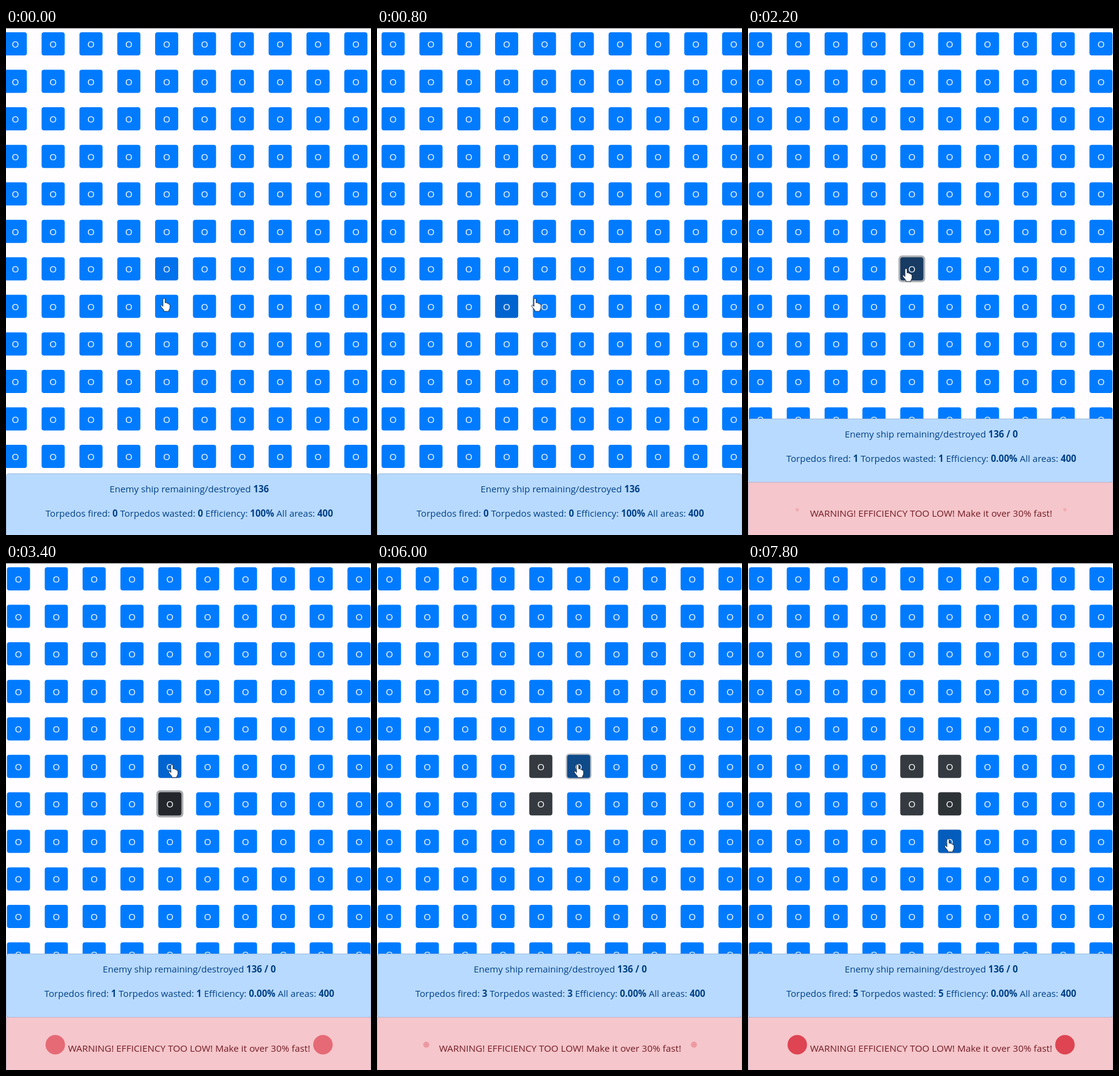
An HTML page that plays this animation: 600x832 px, repeating every 8000 ms.

```html
<!DOCTYPE html>
<html lang="en">
<head>
<meta charset="utf-8">
<title>Torpedo game</title>
<style>
  html, body { margin: 0; width: 100%; height: 100%; overflow: hidden; background: #fff; }
  svg { display: block; width: 100vw; height: 100vh; }
  text { font-family: "Open Sans", "Noto Sans", sans-serif; text-anchor: middle; }
  .bold { font-weight: 700; }
  #stats text { fill: #004085; }
  #warning text { fill: #721c24; font-size: 15.34px; }
</style>
</head>
<body>
<svg id="stage" viewBox="0 0 600 832">
  <rect width="600" height="832" fill="#fffdff"/>
  <g id="grid"></g>
  <rect width="600" height="1" fill="#77777c"/>
  <g id="stats">
    <rect x="0.5" y="0.5" width="599.5" height="104" rx="4" fill="#b8daff" stroke="#9dbbdb"/>
    <text id="ships" x="301.3" y="31" font-size="15.1"></text>
    <text id="shots" x="301.3" y="71" font-size="15.05"></text>
  </g>
  <g id="warning">
    <rect x="0.5" y="745.5" width="599.5" height="90" fill="#f5c6cb" stroke="#c3b3c8"/>
    <text x="301" y="802">WARNING! EFFICIENCY TOO LOW! Make it over 30% fast!</text>
    <circle class="pulse" cx="81" cy="790.5" fill="#dc3545"/>
    <circle class="pulse" cx="521" cy="790.5" fill="#dc3545"/>
  </g>
  <path id="hand" fill="#fff" stroke="#1c2430" stroke-width=".9" stroke-linejoin="round"
    d="M-4 3V-8.2Q-4 -10.3 -2.2 -10.3Q-.4 -10.3 -.4 -8.2V-3Q2 -4 2.8 -2.2Q4.8 -2.8 5.3 -1Q7.6 -1.2 7.6 1.2V4.5Q7.5 7 5.8 9V11H-2.4V9.2L-7.4 3Q-8.2 1 -6.8 .6Q-5.6 .4 -4 3Z"/>
</svg>
<script>
const LOOP = 8000, STEP = 200, FADE = 150;
const BASE = [0, 123, 255], HOVER = [0, 100, 208], PRESSED = [35, 39, 43], SPENT = [52, 58, 64];
const PITCH_X = 62.2, PITCH_Y = 61.55;
const $ = id => document.getElementById(id);
const clamp = v => Math.min(1, Math.max(0, v));
const mix = (a, b, u) => a + (b - a) * u;

// "row,column" -> colour changes over time
const states = {
  '6,3': [[-900, HOVER], [-90, BASE]],
  '7,3': [[20, HOVER], [850, BASE]],
  '7,4': [[850, HOVER], [1500, BASE]],
  '6,4': [[1500, HOVER], [2100, PRESSED], [4150, SPENT]],
  '5,4': [[3200, HOVER], [4150, PRESSED], [5850, SPENT]],
  '5,5': [[5500, HOVER], [5935, PRESSED], [6850, SPENT]],
  '6,5': [[6400, HOVER], [6880, PRESSED], [7715, SPENT]],
  '7,5': [[7300, HOVER], [7783, PRESSED]]
};
const clicks = [2100, 4150, 5935, 6880, 7783];
const path = [
  [0, 262, 454], [1400, 262, 454], [1800, 262, 405], [2800, 262, 405],
  [3300, 275, 341], [3500, 275, 341], [3800, 277, 341], [5200, 277, 341],
  [5600, 332, 341], [6100, 332, 341], [6500, 331, 402], [7100, 331, 402],
  [7500, 331, 463], [LOOP, 331, 463]
];

function add(parent, tag, attrs) {
  const el = document.createElementNS('http://www.w3.org/2000/svg', tag);
  for (const k in attrs) el.setAttribute(k, attrs[k]);
  return parent.appendChild(el);
}

const cells = {};
for (let r = 0; r < 12; r++) {
  for (let c = -1; c < 10; c++) {
    const g = add($('grid'), 'g', {
      transform: `translate(${20.5 + c * PITCH_X} ${26 + r * PITCH_Y})`
    });
    const ring = add(g, 'rect', { fill: 'rgb(82,88,93)', 'fill-opacity': .5, rx: 6 });
    const face = add(g, 'rect', { x: -19, y: -19, width: 38, height: 38, rx: 4, fill: `rgb(${BASE})` });
    add(g, 'text', { y: 6, 'font-size': 15.2, fill: '#fff' }).textContent = 'O';
    cells[r + ',' + c] = { ring, face };
  }
}

function paintCell(key, t) {
  let color = BASE, spread = 0;
  for (const [at, next] of states[key]) {
    const u = clamp((t - at) / FADE);
    color = color.map((v, i) => mix(v, next[i], u));
    const lead = clamp((t - at + 40) / FADE);
    if (next === PRESSED) spread = lead;
    if (next === SPENT) spread *= 1 - lead;
  }
  const { ring, face } = cells[key], half = 19 + 3.2 * spread;
  face.setAttribute('fill', `rgb(${color.map(Math.round)})`);
  ring.setAttribute('x', -half);
  ring.setAttribute('y', -half);
  ring.setAttribute('width', 2 * half);
  ring.setAttribute('height', 2 * half);
  ring.setAttribute('opacity', spread);
}

function handAt(t) {
  const i = Math.max(1, path.findIndex(p => p[0] > t));
  const [a, b] = [path[i - 1], path[i]];
  const u = clamp((t - a[0]) / (b[0] - a[0])), e = u * u * (3 - 2 * u);
  return [mix(a[1], b[1], e), mix(a[2], b[2], e)];
}

const bold = v => `<tspan class="bold">${v}</tspan>`;

function render(t) {
  const scroll = 57 * (1 - clamp((t - 100) / 1000)) ** 1.87;
  $('grid').setAttribute('transform', `translate(${scroll} 0)`);
  for (const key in states) paintCell(key, t);

  const fired = clicks.filter(c => c <= t).length;
  $('stats').setAttribute('transform', `translate(0 ${fired ? 641 : 731})`);
  $('stats').firstElementChild.setAttribute('height', fired ? 104 : 110);
  $('ships').innerHTML = 'Enemy ship remaining/destroyed ' + bold(fired ? '136 / 0' : '136');
  $('shots').innerHTML = `Torpedos fired: ${bold(fired)} Torpedos wasted: ${bold(fired)} ` +
    `Efficiency: ${bold(fired ? '0.00%' : '100%')} All areas: ${bold(400)}`;

  $('warning').setAttribute('visibility', fired ? 'visible' : 'hidden');
  const phase = Math.max(0, t - 2135) / 750 % 1;
  for (const dot of document.querySelectorAll('.pulse')) {
    dot.setAttribute('r', 16 * Math.min(1, 2 * phase));
    dot.setAttribute('opacity', 1 - Math.abs(2 * phase - 1));
  }
  $('hand').setAttribute('transform', `translate(${handAt(t)})`);
}

const start = performance.now();
function tick() {
  const t = (performance.now() - start) % LOOP;
  render(Math.floor(t / STEP) * STEP);
  requestAnimationFrame(tick);
}
tick();
</script>
</body>
</html>
```
